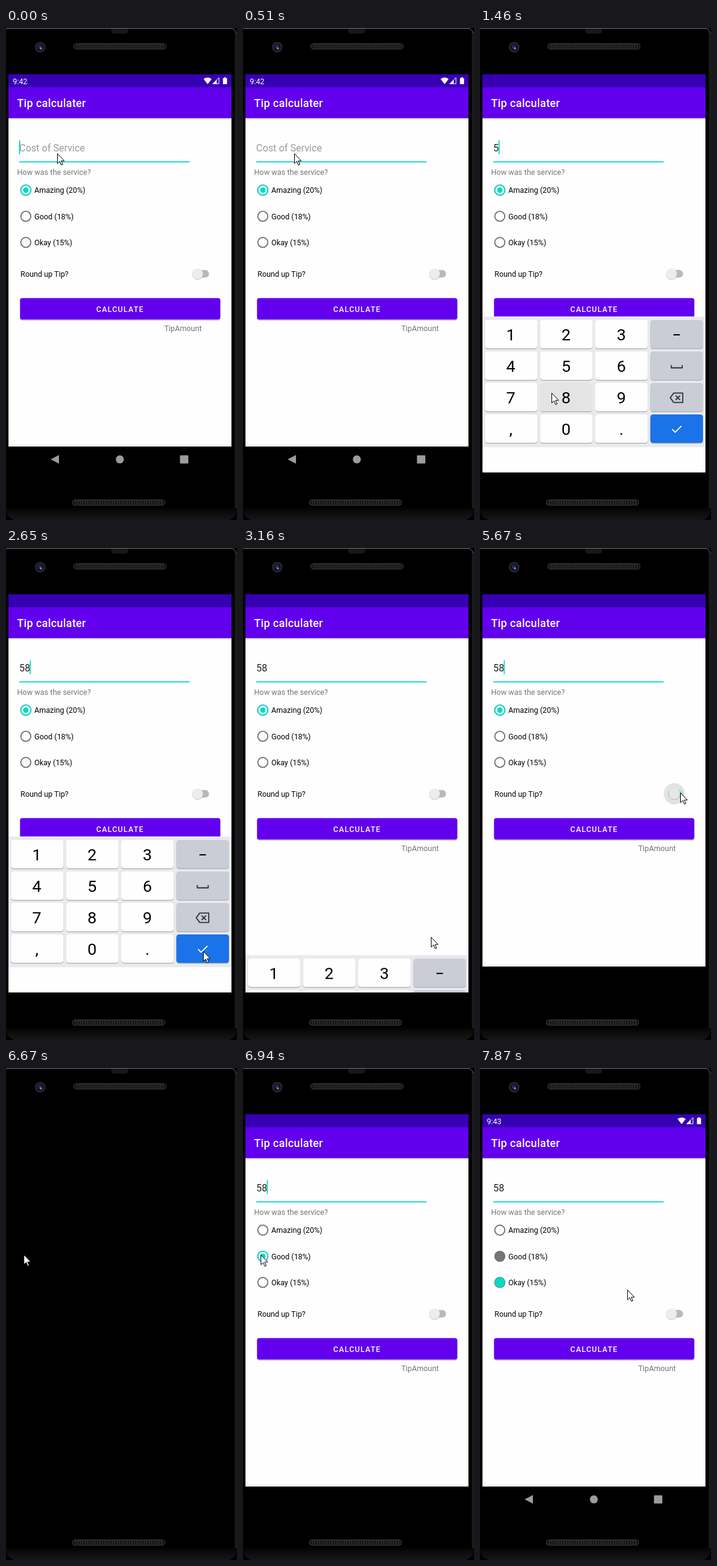
Recreate the animation shown at these times as an HTML page. Size 375 by 797 pixels, loop 8000 ms.

```html
<!DOCTYPE html>
<html lang="en">
<head>
<meta charset="utf-8">
<title>Tip calculater</title>
<style>
html, body { margin: 0; width: 100%; height: 100%; overflow: hidden; background: #000; }
svg { display: block; width: 375px; height: 797px; font: 12.32px Roboto, "Noto Sans", sans-serif; }
.mid { font-weight: 500; }
.keys { font-size: 26.5px; text-anchor: middle; }
.line { fill: none; stroke-linejoin: round; }

/* hard changes and smooth moves share one 8 s loop */
.cut { animation: 8s step-end infinite; }
.move { animation: 8s linear infinite; }

#status { animation-name: status; }
#nav { animation-name: nav; }
#before { animation-name: before; }
#after { animation-name: after; }
#hint { animation-name: hint; }
#five { animation-name: five; }
#eight { animation-name: eight; }
#caretPos { animation-name: caretPos; }
#caret { animation-name: blink; }
#amazing { animation-name: amazing; }
#good { animation-name: good; }
#goodFill { animation-name: last; }
#okayFill { animation-name: last; }
#track { animation-name: track; }
.slide { animation-name: slide; }
#thumb { animation-name: thumb; }
#ripple { animation-name: ripple; }
#press { animation-name: press; }
#board { animation-name: board; }
#key5 { animation-name: key5; }
#key8 { animation-name: key8; }
#dark { animation-name: dark; }
#mouse { animation-name: mouse; }

@keyframes status {
  0%, 40%, 78.2%, 92% { opacity: 1 }
  7.5%, 56.8%, 83.3% { opacity: 0 }
  100% { opacity: 1 }
}
@keyframes nav {
  0%, 40%, 78.2%, 92% { opacity: 1 }
  7.5%, 55%, 83.3% { opacity: 0 }
  100% { opacity: 1 }
}
@keyframes before { 0% { opacity: 1 } 40%, 100% { opacity: 0 } }
@keyframes after { 0% { opacity: 0 } 40%, 100% { opacity: 1 } }
@keyframes hint { 0% { opacity: 1 } 16.6%, 100% { opacity: 0 } }
@keyframes five { 0% { opacity: 0 } 16.6%, 100% { opacity: 1 } }
@keyframes eight { 0% { opacity: 0 } 20.5%, 100% { opacity: 1 } }
@keyframes caretPos {
  0% { transform: none }
  16.6% { transform: translateX(8.9px) }
  20.5%, 100% { transform: translateX(17.4px) }
}
@keyframes blink {
  0%, 12.5%, 33%, 45.5%, 58%, 70.5%, 84.9% { opacity: 1 }
  6.25%, 26.8%, 39.3%, 51.8%, 64.3%, 76.8%, 91%, 100% { opacity: 0 }
}
@keyframes amazing { 0% { opacity: 1 } 83.3%, 100% { opacity: 0 } }
@keyframes good { 0% { opacity: 0 } 83.3% { opacity: 1 } 97.5%, 100% { opacity: 0 } }
@keyframes last { 0% { opacity: 0 } 97.5%, 100% { opacity: 1 } }
@keyframes track {
  0%, 63.7% { fill: #b9b9b9 }
  66%, 70% { fill: #8feae1 }
  70.8%, 72.8% { fill: #a0ddd7 }
  73.5%, 100% { fill: #b9b9b9 }
}
@keyframes slide {
  0%, 63.7% { transform: none }
  66.2%, 70% { transform: translateX(13px) }
  70.8%, 72.8% { transform: translateX(4.5px) }
  73.5%, 100% { transform: none }
}
@keyframes thumb {
  0%, 63.7% { fill: #ececec }
  66.2%, 70% { fill: #03dac5 }
  70.8%, 72.8% { fill: #e7e7e7 }
  73.5%, 100% { fill: #ececec }
}
@keyframes ripple {
  0%, 62.5%, 66.5%, 70% { opacity: 0 }
  63.7%, 70.8%, 72.8% { opacity: 1 }
  73.5%, 100% { opacity: 0 }
}
@keyframes press {
  0%, 51.5% { opacity: 0 }
  53%, 55% { opacity: .38 }
  58.5%, 100% { opacity: 0 }
}
@keyframes board {
  0%, 7.5% { transform: translateY(255px); animation-timing-function: ease-out }
  10.6%, 36.9% { transform: none; animation-timing-function: ease-in }
  40%, 100% { transform: translateY(255px) }
}
@keyframes key5 { 0% { opacity: 0 } 14.6% { opacity: 1 } 16.6%, 100% { opacity: 0 } }
@keyframes key8 { 0% { opacity: 0 } 17.9% { opacity: 1 } 20.5%, 100% { opacity: 0 } }
@keyframes dark { 0% { opacity: 0 } 83.3% { opacity: 1 } 84.87%, 100% { opacity: 0 } }
@keyframes mouse {
  0%, 8.5% { transform: translate(83px, 203px); animation-timing-function: ease-in-out }
  14.3%, 16.4% { transform: translate(135px, 546px); animation-timing-function: ease-in-out }
  18.1%, 21% { transform: translate(116px, 591px); animation-timing-function: ease-in-out }
  29.7%, 36.9% { transform: translate(320px, 653px); animation-timing-function: ease-in-out }
  48%, 56% { transform: translate(189px, 451px); animation-timing-function: ease-in-out }
  62.5%, 76.5% { transform: translate(325px, 396px); animation-timing-function: ease-in-out }
  82.5%, 86.5% { transform: translate(28.5px, 302px); animation-timing-function: ease-in-out }
  92%, 95.6% { transform: translate(29px, 345px); animation-timing-function: ease-in-out }
  98.3%, 100% { transform: translate(239px, 359px) }
}
</style>
</head>
<body>
<svg viewBox="0 0 375 797">
  <defs>
    <linearGradient id="chin" x2="0" y2="1">
      <stop offset="0" stop-color="#000"/>
      <stop offset=".4" stop-color="#0b0b0b"/>
      <stop offset="1" stop-color="#161616"/>
    </linearGradient>
    <linearGradient id="fall" x2="0" y2="1">
      <stop offset="0" stop-color="#000" stop-opacity=".22"/>
      <stop offset="1" stop-color="#000" stop-opacity="0"/>
    </linearGradient>
    <pattern id="mesh" width="4" height="9" patternUnits="userSpaceOnUse">
      <path d="M.5 1.5 2.5 4.5.5 7.5" fill="none" stroke="#4a4a47"/>
    </pattern>
    <clipPath id="glass"><path d="M4 75h362v645H4z"/></clipPath>
    <g id="grille">
      <rect x=".5" y=".5" width="150" height="8.6" rx="4.3" fill="#131313" stroke="#464643"/>
      <rect x="3" y="1" width="145" height="7.6" rx="3.5" fill="url(#mesh)"/>
    </g>
    <rect id="key" width="85.4" height="46" rx="4.5"/>
    <g id="keyBox">
      <use href="#key" y="1.2" fill="#a9acb1"/>
      <use href="#key"/>
    </g>
    <g id="row">
      <g fill="#fefefe">
        <use href="#keyBox" x="7.8"/>
        <use href="#keyBox" x="97.4"/>
        <use href="#keyBox" x="187"/>
      </g>
      <use href="#keyBox" x="276.6" fill="#cacdd5"/>
    </g>
    <circle id="ring" r="8.1" fill="#fefefe" stroke-width="1.9"/>
    <g id="picked">
      <use href="#ring" stroke="#03dac5"/>
      <circle r="4.5" fill="#03dac5"/>
    </g>
  </defs>

  <!-- phone body -->
  <path d="M0 0h375v797H0z"/>
  <path d="M0 775h375v22H0z" fill="url(#chin)"/>
  <path d="M0 782Q3 794 14 797H0zM375 782Q372 794 361 797h14z" fill="#020202"/>
  <path d="M371.5 8h3.5v770h-3.5z" fill="#1b1b1b"/>
  <path d="M0 .5h366q5 .5 8 8" class="line" stroke="#777"/>
  <path d="M171 1h27v4q0 4-4 4h-19q-4 0-4-4z" fill="#171717"/>
  <circle cx="55.5" cy="31" r="8.7" fill="#252524"/>
  <circle cx="55.5" cy="31" r="5.6" fill="#0b0d1d"/>
  <circle cx="55" cy="30.5" r="3.4" fill="#202b62"/>
  <circle cx="56.8" cy="33" r="1.7" fill="#7b8ce4"/>
  <use href="#grille" x="109.5" y="25"/>
  <use href="#grille" x="107" y="764"/>

  <g clip-path="url(#glass)">
    <path d="M4 75h362v603H4z" fill="#fefefe"/>
    <path d="M4 75h362v21.5H4z" fill="#3700b3"/>
    <path d="M4 96h362v50H4z" fill="#6200ee"/>
    <path d="M4 146h362v3H4z" fill="url(#fall)"/>

    <g id="status" class="cut" fill="#fff">
      <text id="before" class="cut" x="11" y="90.5">9:42</text>
      <text id="after" class="cut" x="11" y="90.5">9:43</text>
      <path d="M320.8 82.7Q327.3 77.8 333.8 82.7L327.3 91z"/>
      <path d="M335.8 90.3 345.8 80.5v9.8z" fill="none" stroke="#fff"/>
      <path d="M335 91 342 84v7z"/>
      <path d="M354 80h3v1.3h1.8v9.7h-6.6v-9.7H354z"/>
    </g>

    <text x="18" y="128" class="mid" font-size="17.8" letter-spacing=".25" fill="#fff">Tip calculater</text>

    <!-- cost field -->
    <g font-size="15.84">
      <text id="hint" class="cut" x="21.6" y="199.5" fill="#9b9b9b">Cost of Service</text>
      <text id="five" class="cut" x="21.6" y="199.5" fill="#222">5</text>
      <text id="eight" class="cut" x="30.5" y="199.5" fill="#222">8</text>
    </g>
    <g id="caretPos" class="cut">
      <path id="caret" class="cut" d="M21.2 182h1.8v22.5h-1.8z" fill="#03dac5"/>
    </g>
    <path d="M21.5 216h276.5v1.8H21.5z" fill="#03dac5"/>

    <text x="18" y="237.6" fill="#757575" letter-spacing=".05">How was the service?</text>

    <g stroke="#757575">
      <use href="#ring" x="32.2" y="262.6"/>
      <use href="#ring" x="32.2" y="305"/>
      <use href="#ring" x="32.2" y="347.3"/>
    </g>
    <use id="amazing" class="cut" href="#picked" x="32.2" y="262.6"/>
    <use id="good" class="cut" href="#picked" x="32.2" y="305"/>
    <circle id="goodFill" class="cut" cx="32.2" cy="305" r="8.1" fill="#757575"/>
    <circle id="okayFill" class="cut" cx="32.2" cy="347.3" r="8.2" fill="#03dac5"/>
    <text x="46" y="267">Amazing (20%)</text>
    <text x="46" y="309.5">Good (18%)</text>
    <text x="46" y="351.8">Okay (15%)</text>

    <!-- switch -->
    <text x="23.6" y="402.6">Round up Tip?</text>
    <g class="move slide">
      <circle id="ripple" class="move" cx="311" cy="398.2" r="17.2" fill="#e2e2e2"/>
    </g>
    <rect id="track" class="move" x="305" y="392" width="24.6" height="12.3" rx="6.1" fill="#b9b9b9"/>
    <g class="move slide">
      <circle cx="311" cy="399" r="9.1" opacity=".2"/>
      <circle id="thumb" class="move" cx="311" cy="398.2" r="8.8" fill="#ececec"/>
    </g>

    <!-- button -->
    <rect x="22.5" y="438.5" width="326" height="35.6" rx="4" opacity=".2"/>
    <rect x="22.8" y="437.4" width="325" height="34.8" rx="3.6" fill="#6200ee"/>
    <rect id="press" class="move" x="22.8" y="437.4" width="325" height="34.8" rx="3.6" fill="#fff" opacity="0"/>
    <text x="146.6" y="459.6" class="mid" letter-spacing="1.1" fill="#fff">CALCULATE</text>
    <text x="257" y="491.3" fill="#757575">TipAmount</text>

    <g id="nav" class="cut" fill="#9c9c9c">
      <path d="M72.5 698.8 86 691.8v14z"/>
      <circle cx="184.8" cy="698.8" r="6.5"/>
      <rect x="282.4" y="692.2" width="13.6" height="13.4" rx="1"/>
    </g>

    <!-- number pad -->
    <g id="board" class="move">
      <path d="M4 467.5h362V720H4z" fill="#fefefe"/>
      <path d="M4 467.5h362v211.5H4z" fill="#e8eaed"/>
      <use href="#row" y="473"/>
      <use href="#row" y="524"/>
      <use href="#row" y="575"/>
      <use href="#row" y="626"/>
      <use href="#keyBox" x="276.6" y="626" fill="#1a73e8"/>
      <use id="key5" class="cut" href="#key" x="97.4" y="524" fill="#e4e4e4"/>
      <use id="key8" class="cut" href="#key" x="97.4" y="575" fill="#e4e4e4"/>
      <g class="keys">
        <text x="50" y="506">1</text><text x="139.8" y="506">2</text><text x="229.5" y="506">3</text>
        <text x="50" y="557">4</text><text x="139.8" y="557">5</text><text x="229.5" y="557">6</text>
        <text x="50" y="608">7</text><text x="139.8" y="608">8</text><text x="229.5" y="608">9</text>
        <text x="50" y="659">,</text><text x="139.8" y="659">0</text><text x="229.5" y="659">.</text>
      </g>
      <g class="line" stroke="#303236" stroke-width="1.8">
        <path d="M314 497h10.5" stroke="#000" stroke-width="2"/>
        <path d="M310.5 546v4.5h17.8V546"/>
        <path d="M308.8 599 314.5 591.4h14.7v15.2h-14.7zM317.5 595.3l7.4 7.4m0-7.4-7.4 7.4"/>
        <path d="M311.8 649.8l5 5 10.2-10.2" stroke="#fff"/>
      </g>
    </g>

    <path id="dark" class="cut" d="M4 75h362v645H4z" opacity="0"/>
  </g>

  <g id="mouse" class="move">
    <path d="M.5.5v16l3.7-3.5 2.6 6 2.4-1-2.6-5.8h5z" fill="#fff" stroke="#000"/>
  </g>
</svg>
</body>
</html>
```
